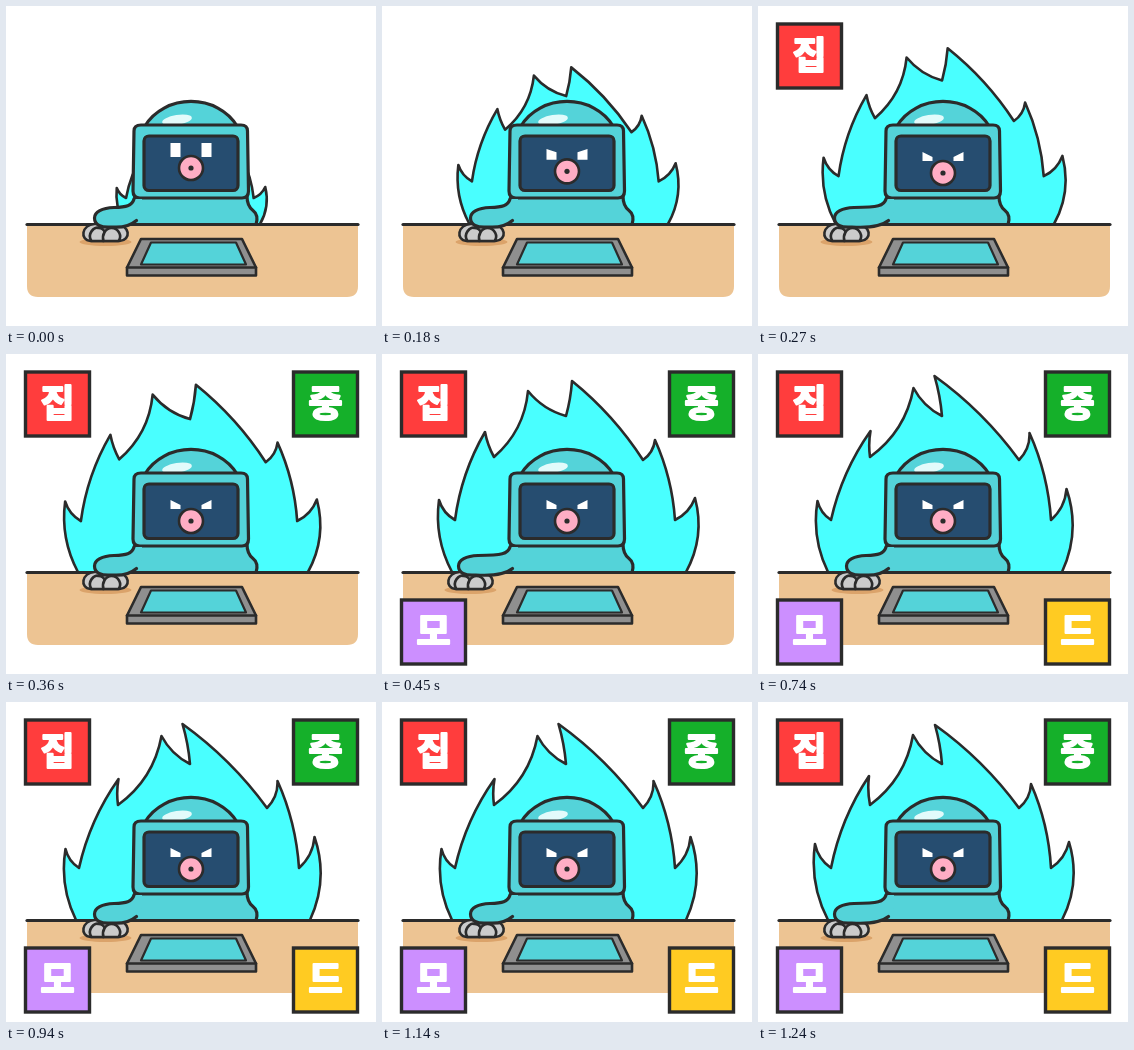
Write an HTML page that moves like this. It is 370x320 px and loops after 1340 ms.

```html
<!DOCTYPE html>
<html lang="ko">
<head>
<meta charset="utf-8">
<style>
html, body { margin: 0; width: 100%; height: 100%; overflow: hidden; background: #fff; }
svg { display: block; width: 370px; height: 320px; }
.ink { stroke: #2b2b2b; stroke-width: 3.2; stroke-linejoin: round; stroke-linecap: round; }
.thin { stroke-width: 2.6; }
.sign rect { stroke-width: 3.4; stroke-linejoin: miter; }
.sign text {
  font: 900 37px "Noto Sans CJK KR", "Noto Sans CJK", "Noto Sans CJK JP", sans-serif;
  fill: #fff; stroke: #fff; stroke-width: 2.2; stroke-linejoin: round; text-anchor: middle;
}
</style>
</head>
<body>
<svg viewBox="0 0 370 320">
  <path id="flame" class="ink thin" fill="#49ffff"/>

  <g class="ink" fill="#54d3d9">
    <path d="M129 190Q128 205 122 219H250Q253 209 247 204.500Q241 200 241 190Z"/>
    <path d="M139 120A52 46 0 0 1 231 120Z"/>
  </g>
  <ellipse cx="171" cy="114" rx="15" ry="5" fill="#e2fbfb" transform="rotate(-9 171 114)"/>
  <path class="ink" fill="#54d3d9" d="M135 119H235Q241.500 119 241.500 125L242.500 185Q242.500 192 236 192H134Q127 192 127 185L128 125Q128 119 135 119Z"/>
  <rect class="ink" x="138" y="130" width="94" height="54.500" rx="5" fill="#264d70"/>
  <path id="eyes" fill="#fff"/>
  <g id="mouth">
    <circle class="ink thin" r="12" fill="#ffadc4"/>
    <circle r="2.600" fill="#2b2b2b"/>
  </g>

  <path fill="#edc493" d="M21 219H352V280Q352 291 341 291H32Q21 291 21 280Z"/>
  <path class="ink" d="M21 218.500H352"/>

  <g class="ink thin">
    <path fill="#8f8f8f" d="M135 233H236L250 261.500V269.500H121V261.500Z"/>
    <path fill="none" d="M121 261.500H250"/>
    <path fill="#54d3d9" stroke-width="2.200" d="M145 236.500H230L240 258.500H135Z"/>
  </g>

  <g id="mouse">
    <ellipse cy="236" rx="26" ry="4" fill="#dba36a"/>
    <g class="ink thin" fill="#cbcbcb">
      <path d="M-15 235C-26 234 -24 219 -11 218H10C25 219 26 234 14 235Z"/>
      <path d="M-14 235C-19 228 -11 220 -7 222C0 222 2 231 -2 235Z"/>
      <path d="M-2 235C-4 229 0 222 6 222C13 222 17 230 13 235Z"/>
    </g>
  </g>
  <path id="armFill" fill="#54d3d9"/>
  <path id="arm" class="ink" fill="none"/>
  <g id="signs"></g>
</svg>
<script>
const $ = id => document.getElementById(id);
const clamp = v => Math.max(0, Math.min(1, v));

// Flame outline: tips sway by lean, notches stay put.
const tips = [
  { x: 57, y: 146, lean: 0 }, { x: 103, y: 78, lean: 8 }, { x: 146, y: 37, lean: 9 },
  { x: 190, y: 27, lean: -13 }, { x: 273, y: 86, lean: 0 }, { x: 313, y: 144, lean: -2 }
];
const notches = [[70, 218], [73, 166], [112, 103], [184, 62], [261, 106], [293, 166], [304, 218]];
// Sideways bend of each stretch, as a share of its length.
const rise = [-.16, -.1, .2, .05, .22, .2];
const fall = [.2, .08, .16, -.08, -.09, -.2];

function curve([x, y], [u, v], bend) {
  return `Q${(x + u) / 2 - (v - y) * bend} ${(y + v) / 2 + (u - x) * bend} ${u} ${v}`;
}

function flamePath(step) {
  const left = (1 - clamp(step / 5)) ** 2;
  const place = ([x, y]) => [185 + (x - 185) * (1 - .42 * left), 218 + (y - 218) * (1 - .5 * left)];
  const lean = clamp((step - 5) / 2);
  const flick = step > 6 && step % 2 === 0 ? 1 : 0;

  const low = notches.map(place);
  let d = `M${low[0]}`;
  tips.forEach((t, i) => {
    const lift = (5 - 2 * i) * flick;
    const tip = place([t.x + t.lean * lean + lift / 2, t.y - 4 * lean + lift]);
    d += curve(low[i], tip, rise[i]) + curve(tip, low[i + 1], fall[i]);
  });
  return d;
}

function armPath(s) {
  return `M128 193C126 200 120 201 ${108 - s} 201.5C${96 - s} 202 ${88.5 - s} 206 ${88.5 - s} 212` +
    `C${88.5 - s} 219 ${95 - s} 222 ${106 - s} 221C${117 - s / 2} 222 124 220 130.5 214.5`;
}

const signs = [["집", "#ff3d3d"], ["중", "#15b02a"], ["모", "#cc8fff"], ["드", "#ffcb22"]];
$("signs").innerHTML = signs.map(([word, color], i) =>
  `<g class="sign" transform="translate(${19.5 + 268 * (i % 2)} ${18 + 228 * (i >> 1)})">
    <rect class="ink" width="64" height="64" fill="${color}"/>
    <text x="32" y="45">${word}</text>
  </g>`).join("");

function draw(step) {
  $("flame").setAttribute("d", flamePath(step));

  const frown = clamp(step / 3);
  const outer = 137 + 9 * frown, inner = 137 + 14 * frown, low = 151 + 4 * frown;
  const eye = (a, b) => `M${a} ${outer}L${b} ${inner}V${low}H${a}Z`;
  $("eyes").setAttribute("d", eye(164.5, 174.5) + eye(205.5, 195.5));
  $("mouth").setAttribute("transform", `translate(185 ${162 + 5 * frown})`);

  const slide = step % 2 * 12;
  const arm = armPath(slide);
  $("arm").setAttribute("d", arm);
  $("armFill").setAttribute("d", arm + "L136 206V193Z");
  $("mouse").setAttribute("transform", `translate(${99.5 - slide * .92} 0)`);

  [...$("signs").children].forEach((el, i) => {
    el.style.display = step >= 3 + i ? "" : "none";
  });
}

// Six steps of 90 ms, then eight of 100 ms.
const start = performance.now();
let shown = -1;
function tick() {
  const t = (performance.now() - start) % 1340;
  const step = Math.floor(t < 540 ? t / 90 : 6 + (t - 540) / 100);
  if (step !== shown) draw(shown = step);
  requestAnimationFrame(tick);
}
tick();
</script>
</body>
</html>
```
